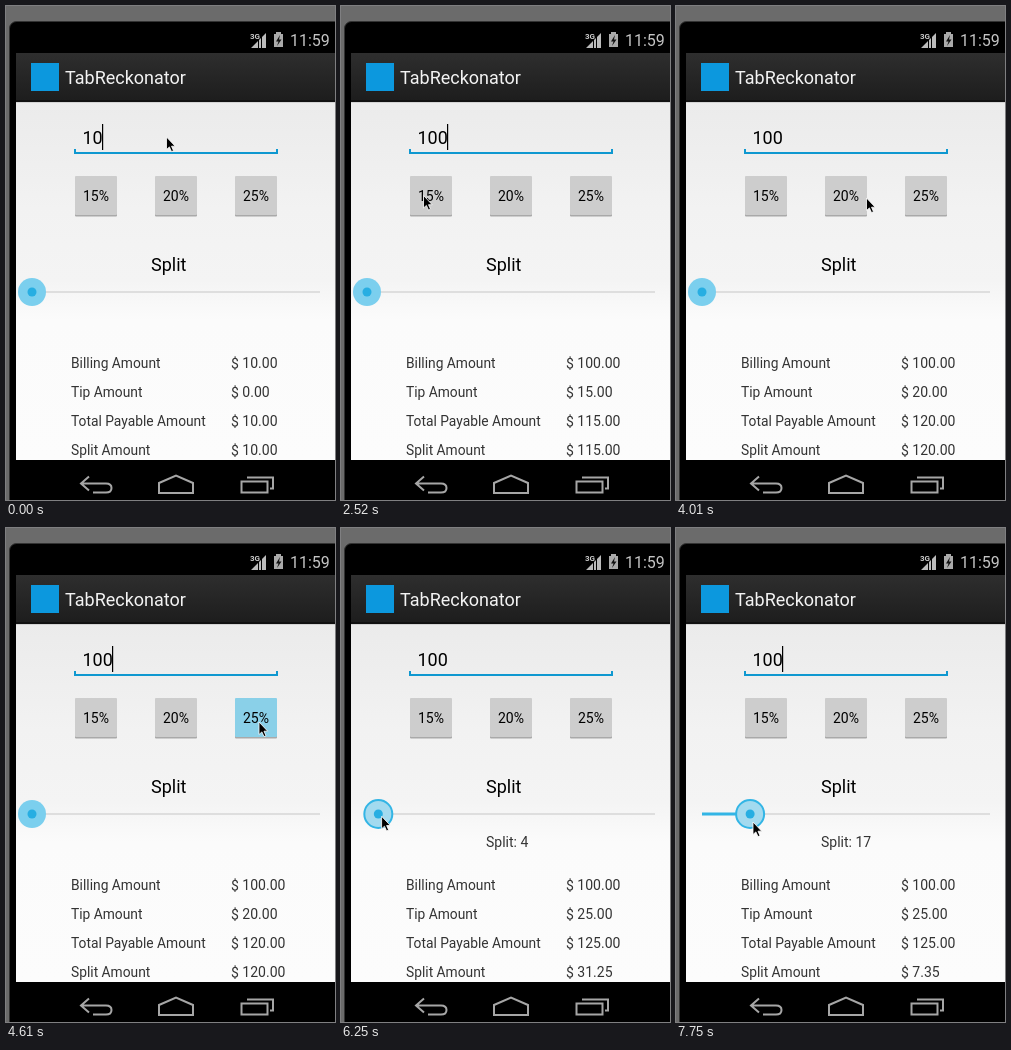
These frames come from a looping animation (329 by 494 pixels, 8 s). An HTML page:

```html
<!DOCTYPE html>
<html lang="en">
<head>
<meta charset="utf-8">
<title>Bill splitter</title>
<style>
  html, body { margin: 0; height: 100%; overflow: hidden; background: #6b6b6b; }
  svg { display: block; width: 100vw; height: 100vh; }
  text { font-family: Roboto, "Noto Sans", sans-serif; font-size: 14px; fill: #333; white-space: pre; }
  .big { font-size: 18px; fill: #000; }
  .key text { fill: #000; text-anchor: middle; }
  .label { font-size: 13.8px; }
  .nav { fill: none; stroke: #a6a6a6; stroke-width: 2; }
</style>
</head>
<body>
<svg viewBox="0 0 329 494" xmlns="http://www.w3.org/2000/svg">
  <defs>
    <linearGradient id="page" x2="0" y2="1">
      <stop offset="0" stop-color="#ebebeb"/>
      <stop offset=".18" stop-color="#efefef"/>
      <stop offset=".3" stop-color="#f2f2f2"/>
      <stop offset=".5" stop-color="#f4f4f4"/>
      <stop offset=".61" stop-color="#fbfbfb"/>
      <stop offset="1" stop-color="#fcfcfc"/>
    </linearGradient>
    <linearGradient id="bar" x2="0" y2="1">
      <stop offset="0" stop-color="#2e2e2e"/>
      <stop offset="1" stop-color="#1d1d1d"/>
    </linearGradient>
  </defs>

  <!-- phone and status bar -->
  <rect width="329" height="494" fill="#6b6b6b"/>
  <rect x="3.500" y="15.500" width="340" height="500" rx="7" stroke="#333"/>
  <text x="244" y="33" style="font-size:8px;font-weight:700;fill:#ccc">3G</text>
  <path d="M245 42L252 35V42Z M253 42V34L255 32V42Z M256 42V31L260 27V42Z" fill="#bbb"/>
  <path d="M270 28V26H275V28H277V41H268V28Z" fill="#aaa"/>
  <path d="M274 29L270 35.500H272.500L271 40L275.500 33.500H273Z" fill="#111"/>
  <text x="284" y="40" style="font-size:16px;fill:#c4c4c4">11:59</text>

  <!-- action bar -->
  <rect x="10" y="47" width="319" height="48" fill="url(#bar)"/>
  <rect x="25" y="57" width="28" height="28" fill="#0c98de"/>
  <text x="59" y="78" class="big" style="fill:#f3f3f3">TabReckonator</text>

  <!-- page -->
  <rect x="10" y="95" width="319" height="359" fill="url(#page)"/>
  <rect x="10" y="94" width="319" height="2" fill="#111"/>
  <rect x="10" y="96" width="319" height="1" fill="#bbb" opacity=".5"/>
  <path d="M69 143V147H271V143" fill="none" stroke="#0f98d0" stroke-width="2"/>
  <text id="bill" x="76.500" y="138" class="big"></text>
  <rect id="caret" y="118" width="1.200" height="26"/>
  <g id="keys"></g>
  <text x="145" y="265" class="big">Split</text>
  <rect x="26" y="285" width="288" height="2" fill="#dedede"/>
  <rect id="done" x="26" y="284.500" height="3" fill="#33b5e5"/>
  <g id="thumb">
    <circle id="halo" r="14" stroke="#33b5e5"/>
    <circle r="4.500" fill="#27aee2"/>
  </g>
  <text id="share" x="145" y="319"></text>
  <g id="rows"></g>

  <!-- navigation bar -->
  <rect x="4" y="454" width="325" height="40"/>
  <g class="nav" transform="translate(0 -1)">
    <path d="M83 471.500L75 478.500L83 485.500M75 478.500H100Q105.500 478.500 105.500 483T100 487.500H87"/>
    <path d="M153 488V478L170 470.500L187 478V488Z"/>
    <path d="M235.500 476.500H261.500V487.500H235.500ZM241 472.500H267V483.500H264"/>
  </g>

  <path id="mouse" d="M0 0V12.500L2.900 9.900L5 14.600L7 13.700L5 9.200H8.700Z" stroke="#fff" stroke-width=".8"/>
</svg>
<script>
const $ = id => document.getElementById(id);
const LOOP = 8000, TICK = 148.7;   // the screen refreshes once per tick

// tick, x, y
const pointer = [[0, 160.5, 131], [8, 160.5, 131], [11, 82.5, 189.5], [19, 82.5, 189.5],
  [22, 166, 194], [26, 166, 194], [27, 190.5, 192], [28, 253, 194], [32, 253, 194],
  [37, 29, 286.5], [40, 29, 286.5], [45, 58, 291], [47, 61, 292], [52, 77, 294]];
// tick, people
const people = [[40, 0], [45, 10], [47, 11], [52, 17]];
const blinks = [7, 10, 13, 17, 20, 24, 27, 30, 33, 37, 40, 44, 47, 50];
// percent, tick pressed, tick released
const taps = [[15, 15, 16], [20, 24, 25], [25, 31, 33]];

function along(keys, k, col) {
  if (k <= keys[0][0]) return keys[0][col];
  for (let i = 1; i < keys.length; i++) {
    const a = keys[i - 1], b = keys[i];
    if (k <= b[0]) return a[col] + (b[col] - a[col]) * (k - a[0]) / (b[0] - a[0]);
  }
  return keys[keys.length - 1][col];
}

$('keys').innerHTML = taps.map(([pct], i) => `<g class="key" transform="translate(${69 + 80 * i} 170)">
  <rect y="1" width="42" height="39.500" rx="1" fill="#a9a9a9"/>
  <rect class="face" width="42" height="39" rx="1"/><text x="21" y="25">${pct}%</text></g>`).join('');
$('rows').innerHTML = ['Billing Amount', 'Tip Amount', 'Total Payable Amount', 'Split Amount']
  .map((s, i) => `<text class="label" x="65" y="${362 + 29 * i}">${s}</text>
  <text class="sum" x="225" y="${362 + 29 * i}"></text>`).join('');
const faces = document.querySelectorAll('.face'), sums = document.querySelectorAll('.sum');

function draw(t) {
  const k = Math.floor((t + 10) / TICK);
  const bill = k < 3 ? 10 : 100;
  const n = Math.round(along(people, k, 1));
  const dragging = k >= 40;
  let rate = 0;

  taps.forEach(([pct, down, up], i) => {
    if (k >= up) rate = pct;
    faces[i].setAttribute('fill', k >= down && k < up ? '#8ad0e8' : '#cdcdcd');
  });
  const tip = bill * rate / 100, total = bill + tip;
  [bill, tip, total, total / Math.max(n, 1)].forEach((v, i) => sums[i].textContent = '$ ' + v.toFixed(2));

  $('bill').textContent = bill;
  $('caret').setAttribute('x', bill < 100 ? 96 : 106);
  $('caret').style.opacity = blinks.filter(b => b <= k).length % 2 ? 0 : 1;

  const x = 26 + 2.83 * n;
  $('done').setAttribute('width', x - 26);
  $('thumb').setAttribute('transform', `translate(${x} 286)`);
  $('halo').setAttribute('fill', dragging ? '#a3daef' : '#7bcfee');
  $('halo').setAttribute('stroke-width', dragging ? 2 : 0);
  $('share').textContent = n ? 'Split: ' + n : '';
  $('mouse').setAttribute('transform', `translate(${along(pointer, k, 1)} ${along(pointer, k, 2)})`);
}

const start = performance.now();
function frame() {
  draw((performance.now() - start) % LOOP);
  requestAnimationFrame(frame);
}
frame();
</script>
</body>
</html>
```
